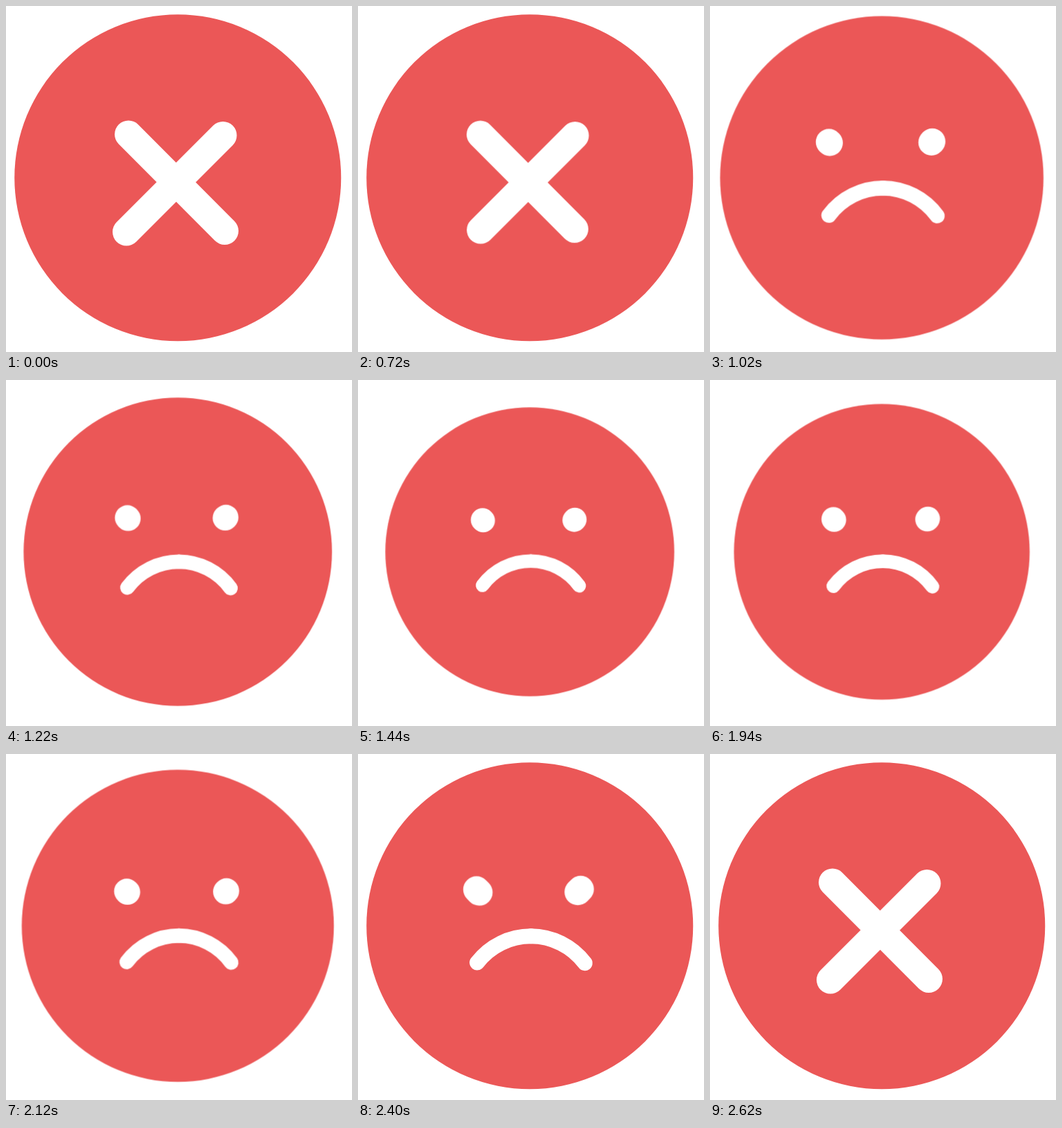
An HTML page that plays this animation: 500 px wide and 500 px high, repeating every 3240 ms.

```html
<!DOCTYPE html>
<html lang="en">
<head>
<meta charset="utf-8">
<title>Cross to sad face</title>
<style>
  html, body { margin: 0; width: 100%; height: 100%; overflow: hidden; background: #fff; }
  svg { display: block; width: 100%; height: 100%; }

  .face, .arm, .lip {
    animation: 3240ms cubic-bezier(.3333, 0, .6667, 1) infinite;
  }
  .face { transform-origin: 248.25px 248.25px; animation-name: breathe; }
  .arm, .lip { fill: none; stroke: #fff; stroke-linecap: round; }
  .arm { stroke-width: 40px; animation-name: shrink; }
  .left { --move: translate(-5.9px, 10.6px); }
  .right { --move: translate(8.4px, 8.4px); }
  .lip { stroke-width: 22px; animation-name: grow; }

  /* 900 ms, 1650 ms, 2400 ms */
  @keyframes breathe {
    0%, 27.778% { transform: scale(1); }
    50.926% { transform: scale(.8576); }
    74.074%, 100% { transform: scale(1); }
  }

  /* 700-940 ms in, 2380-2620 ms out */
  @keyframes shrink {
    0%, 21.605% { stroke-dasharray: 1 2; stroke-width: 40px; transform: translate(0px, 0px); }
    29.012%, 73.457% { stroke-dasharray: .008 2; stroke-width: 38.4px; transform: var(--move); }
    80.864%, 100% { stroke-dasharray: 1 2; stroke-width: 40px; transform: translate(0px, 0px); }
  }
  @keyframes grow {
    0%, 21.605% { stroke-dasharray: .001 2; }
    29.012%, 73.457% { stroke-dasharray: 1 2; }
    80.864%, 100% { stroke-dasharray: .001 2; }
  }
</style>
</head>
<body>
<svg viewBox="0 0 500 500">
  <g class="face">
    <circle cx="248.25" cy="248.25" r="236" fill="#eb5757"/>
    <path class="arm left" pathLength="1" d="M177 185.5L316 325"/>
    <path class="arm right" pathLength="1" d="M313.5 187L174 326.5"/>
    <path class="lip" pathLength="1" d="M250 263.3A98 98 0 0 0 171 303"/>
    <path class="lip" pathLength="1" d="M250 263.3A98 98 0 0 1 329 303.8"/>
  </g>
</svg>
</body>
</html>
```
